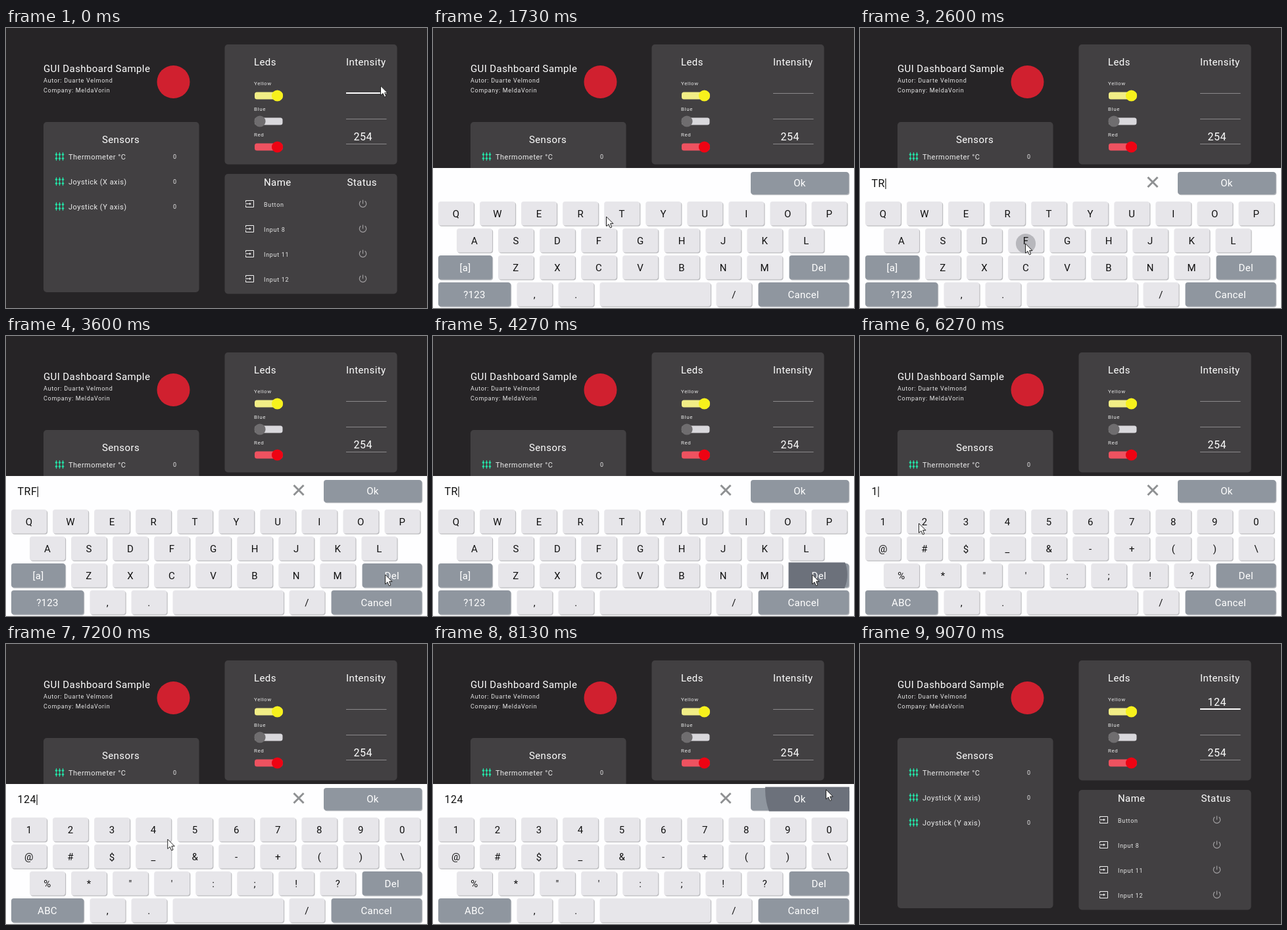
Animation of 640x426 px, one loop 9.34 s. Source, as an HTML page:

```html
<!DOCTYPE html>
<html lang="en">
<head>
<meta charset="utf-8">
<title>GUI Dashboard Sample</title>
<style>
  html, body { margin: 0; height: 100%; overflow: hidden; background: #262426; }
  svg { display: block; }
  #stage { width: 100vw; height: 100vh; }
  text { font-family: Roboto, sans-serif; fill: #fff; white-space: pre; }
  .h { font-size: 15px; letter-spacing: .4px; }
  .value { font-size: 16px; letter-spacing: .5px; }
  .row { font-size: 11px; letter-spacing: .48px; fill: #ececec; }
  .small { font-size: 9px; letter-spacing: .7px; fill: #e6e6e6; }
  .tiny { font-size: 8px; letter-spacing: .6px; fill: #e6e6e6; }
  .key { font-size: 15px; letter-spacing: .3px; text-anchor: middle; }
  .dark { fill: #111; }
  .mid { text-anchor: middle; }
  .panel { fill: #424042; }
  .line { fill: #8b898b; }
</style>
</head>
<body>
<svg id="stage" viewBox="0 0 640 426">
  <defs>
    <g id="slider">
      <path d="M0 0V13" stroke="#25dfa5"/>
      <path d="M0 1L2 3.500L0 6L-2 3.500ZM0 7L2 9.500L0 12L-2 9.500Z" fill="#25dfa5"/>
    </g>
    <g id="sliders">
      <use href="#slider" x="2.500"/><use href="#slider" x="7.500"/><use href="#slider" x="12.500"/>
    </g>
    <g id="input" fill="none" stroke="#f4f4f4">
      <path d="M.5 3.500V.5H12.500V10.500H.5V7.500M0 5.500H7"/>
      <path d="M6.200 3.500L8.800 5.500L6.200 7.500Z" fill="#f4f4f4" stroke="none"/>
    </g>
    <path id="power" d="M0-6V0M-3.200-4.200A5.200 5.200 0 1 0 3.200-4.200" fill="none" stroke="#a09ea0" stroke-width="1.200"/>
  </defs>

  <rect width="640" height="426" fill="#262426"/>
  <rect class="panel" x="57" y="143" width="236.500" height="259" rx="5"/>
  <rect class="panel" x="332.500" y="25" width="262" height="182.500" rx="5"/>
  <rect class="panel" x="332.500" y="222" width="262" height="182.500" rx="5"/>

  <text class="h" x="57" y="67">GUI Dashboard Sample</text>
  <text class="small" x="57" y="83">Autor: Duarte Velmond</text>
  <text class="small" x="57" y="98">Company: MeldaVorin</text>
  <circle cx="254.500" cy="82" r="25" fill="#d0202f"/>

  <text class="h mid" x="174.500" y="175">Sensors</text>
  <text class="h" x="377" y="57">Leds</text>
  <text class="h" x="517" y="57">Intensity</text>
  <text class="h" x="392" y="240">Name</text>
  <text class="h" x="518.500" y="240">Status</text>
  <g id="lists"></g>

  <rect id="focus" x="517" width="61.500"/>
  <rect class="line" x="517" y="138" width="61.500" height="1"/>
  <rect class="line" x="517" y="176" width="61.500" height="1"/>
  <text class="value" id="level" x="528.500" y="94">124</text>
  <text class="value" x="528.500" y="170.500">254</text>

  <g id="board">
    <rect y="213" width="640" height="213" fill="#fefeff"/>
    <text class="value dark" id="entry" x="17.500" y="241.500"></text>
    <rect id="caret" y="229" width="1.200" height="16" fill="#222"/>
    <path id="clear" d="M437.500 227L452.500 242M452.500 227L437.500 242" stroke="#8f9193" stroke-width="3"/>
    <g id="caps"></g>
    <svg id="ripple"><circle/></svg>
    <g id="labels"></g>
  </g>

  <path id="pointer" d="M-.5 0V14.500L3 11.500L5.400 17L7.800 16L5.600 10.600H10Z" fill="#fff" stroke="#222" stroke-width="1"/>
</svg>

<script>
const LOOP = 9340, PRESS = 250;
const $ = id => document.getElementById(id);

// Dashboard rows
const sensors = ['Thermometer °C', 'Joystick (X axis)', 'Joystick (Y axis)'];
const inputs = ['Button', 'Input 8', 'Input 11', 'Input 12'];
const leds = [
  ['Yellow', '#f1ed86', '#f7f11c', 1],
  ['Blue', '#d9d8dc', '#6f6d6f', 0],
  ['Red', '#ee5260', '#ee0313', 1]
];
$('lists').innerHTML =
  sensors.map((name, i) => {
    const y = 196 + 38 * i;
    return `<use href="#sliders" x="74" y="${y - 7}"/>
      <text class="row" x="95" y="${y + 4}">${name}</text>
      <text class="small mid" x="257" y="${y + 3}">0</text>`;
  }).join('') +
  inputs.map((name, i) => {
    const y = 268 + 38 * i;
    return `<use href="#input" x="364" y="${y - 6}"/>
      <text class="small" x="392" y="${y + 3.5}">${name}</text>
      <use href="#power" x="542.5" y="${y - 0.5}"/>`;
  }).join('') +
  leds.map(([name, track, knob, on], i) => {
    const y = 103 + 39 * i;
    return `<text class="tiny" x="377" y="${y - 16}">${name}</text>
      <rect x="378" y="${y - 5.5}" width="42.5" height="11" rx="3.5" fill="${track}"/>
      <circle cx="${on ? 412.5 : 386}" cy="${y}" r="8.6" fill="${knob}"/>`;
  }).join('');

// Keyboard layouts
const key = (label, x, y, w = 54, gray = false, h = 36.5) => ({ label, x, y, w, h, gray });
const keyRow = (chars, x, y) => [...chars].map((c, i) => key(c, x + 63.05 * i, y));
const shared = mode => [
  key('Ok', 483, 219, 149, true, 34), key('Del', 541.5, 346, 90.5, true),
  key(mode, 8, 387, 110, true), key(',', 127.5, 387), key('.', 190.5, 387),
  key('', 253.5, 387, 168.5), key('/', 430.5, 387), key('Cancel', 494.5, 387, 137.5, true)
];
const letters = [
  ...keyRow('QWERTYUIOP', 8, 264), ...keyRow('ASDFGHJKL', 36, 305),
  key('[a]', 8, 346, 82, true), ...keyRow('ZXCVBNM', 99, 346), ...shared('?123')
];
const symbols = [
  ...keyRow('1234567890', 8, 264), ...keyRow('@#$_&-+()\\', 8, 305),
  ...keyRow('%*"\':;!?', 36, 346), ...shared('ABC')
];
let shown;
function showLayout(keys) {
  if (shown === keys) return;
  shown = keys;
  $('caps').innerHTML = keys.map(({ x, y, w, h, gray }) => {
    const box = (d, fill) =>
      `<rect x="${x + d}" y="${y + d}" width="${w}" height="${h}" rx="4" fill="${fill}"/>`;
    return box(1.2, gray ? '#b3b6bb' : '#bdbdc0') + box(0, gray ? '#8f969f' : '#e7e6ea');
  }).join('');
  $('labels').innerHTML = keys.map(({ label, x, y, w, h, gray }) =>
    `<text class="key${gray ? '' : ' dark'}" x="${x + w / 2}" y="${y + h / 2 + 5.3}">${label.replace('&', '&amp;')}</text>`
  ).join('');
}

// [start, key label, x, y]
const presses = [
  [1735, 'T', 264, 287], [2150, 'R', 220, 288], [2500, 'F', 252, 328],
  [3650, 'Del', 577, 363], [4050, 'Del', 577, 363], [4400, 'Del', 577, 363],
  [4965, '?123', 76, 405], [5990, '1', 30, 286], [6330, '2', 90, 285],
  [6950, '4', 224, 288], [7938, 'Ok', 598, 222]
];
// Pointer stops: [time, x, y]
const stops = [
  [0, 570, 88], [1000, 570, 88], [1150, 568, 72], [1640, 264, 287], [1960, 264, 287],
  [2110, 220, 288], [2340, 220, 288], [2480, 252, 328], [2680, 252, 328],
  [3350, 577, 363], [4560, 577, 363], [4920, 76, 405], [5350, 76, 405],
  [5880, 30, 286], [6080, 30, 286], [6240, 90, 285], [6600, 90, 285],
  [6900, 224, 288], [7150, 224, 288], [7400, 430, 372], [7720, 605, 232],
  [7850, 598, 221.5], [8680, 598, 221.5], [8830, 576, 199], [9050, 541, 81]
];
const OPEN = 300, OPENED = 750, CLOSE = 8230, CLOSED = 8650, POINTER_OFF = 9060;

const clamp = v => Math.max(0, Math.min(1, v));
const smooth = v => v * v * (3 - 2 * v);
const mix = (a, b, p) => a + (b - a) * p;
const show = (id, on) => $(id).setAttribute('visibility', on ? 'inherit' : 'hidden');
function set(el, attrs) {
  for (const name in attrs) el.setAttribute(name, attrs[name]);
}

function pointerAt(t) {
  const i = stops.findIndex(s => s[0] > t);
  if (i < 0) return stops[stops.length - 1].slice(1);
  const [a, b] = [stops[i - 1], stops[i]];
  const p = smooth((t - a[0]) / (b[0] - a[0]));
  return [mix(a[1], b[1], p), mix(a[2], b[2], p)];
}

function typedAt(t) {
  let text = '', keys = letters;
  for (const [start, label] of presses) {
    if (t < start + PRESS) break;
    if (label === 'Del') text = text.slice(0, -1);
    else if (label === '?123') keys = symbols;
    else if (label !== 'Ok') text += label;
  }
  return { text, keys };
}

function drawRipple(t) {
  const press = presses.find(([start]) => t >= start && t < start + PRESS);
  show('ripple', press);
  if (!press) return;
  const [start, label, px, py] = press;
  const k = shown.find(k => k.label === label);
  const x = k.x - 1, y = k.y - 1.5, w = k.w + 2, h = k.h + 3;
  const reach = Math.hypot(Math.max(px - x, x + w - px), Math.max(py - y, y + h - py));
  set($('ripple'), { x, y, width: w, height: h });
  set($('ripple').firstElementChild, {
    cx: px - x, cy: py - y, r: reach * (t - start) / PRESS,
    fill: k.gray ? '#6c717b' : '#b7b7bc'
  });
}

function render(t) {
  const up = smooth(clamp((t - OPEN) / (OPENED - OPEN))) - smooth(clamp((t - CLOSE) / (CLOSED - CLOSE)));
  show('board', up > 0);
  $('board').setAttribute('transform', `translate(0 ${213 * (1 - up)})`);

  const focused = t < OPEN || t >= CLOSED;
  set($('focus'), { y: focused ? 98 : 99, height: focused ? 2 : 1, fill: focused ? '#fff' : '#8b898b' });
  show('level', t >= CLOSED);

  const { text, keys } = typedAt(t);
  showLayout(keys);
  if ($('entry').textContent !== text) $('entry').textContent = text;
  show('clear', text);
  show('caret', up > 0 && (t + 800) % 1000 < 500);
  $('caret').setAttribute('x', 18 + (text ? $('entry').getComputedTextLength() : 0));
  drawRipple(t);

  show('pointer', t < POINTER_OFF);
  $('pointer').setAttribute('transform', `translate(${pointerAt(t)})`);
}

const began = performance.now();
function tick() {
  render((performance.now() - began) % LOOP);
  requestAnimationFrame(tick);
}
tick();
</script>
</body>
</html>
```
